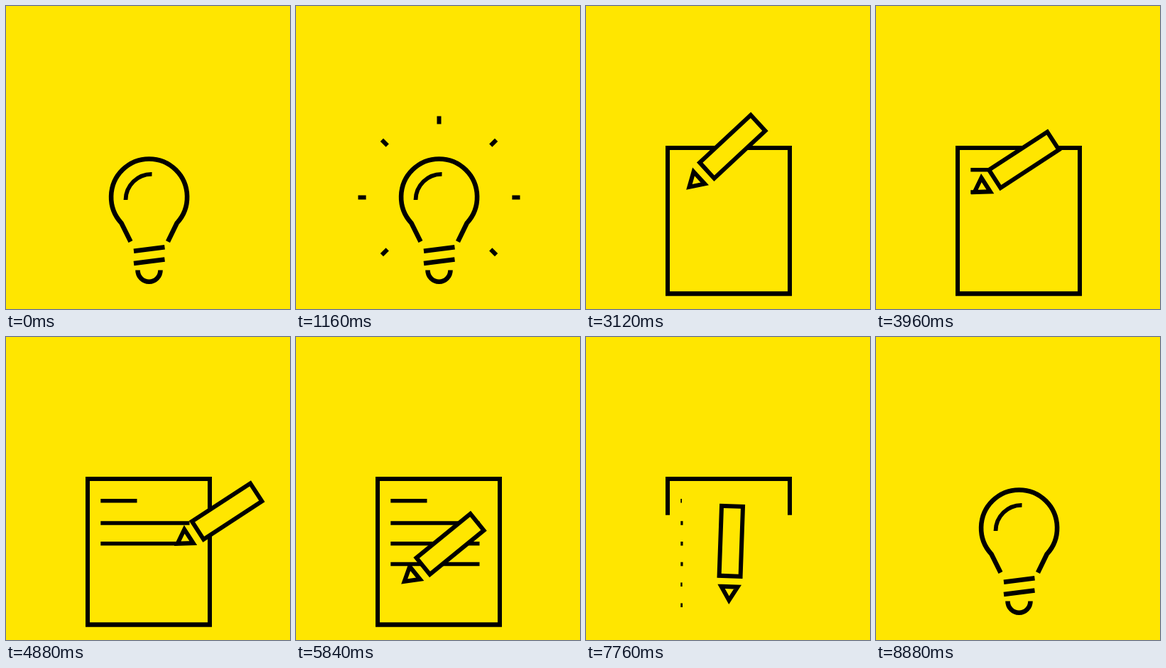
Write an HTML page that moves like this. It is 400 px wide and 425 px high and loops after 8.96 s.

```html
<!DOCTYPE html>
<html lang="en">
<head>
<meta charset="utf-8">
<title>Idea to page</title>
<style>
  html, body { margin: 0; width: 100%; height: 100%; overflow: hidden; background: #ffe600; }
  svg { display: block; width: 100vw; height: 100vh; }
  #stage { fill: none; stroke: #000; stroke-width: 6; stroke-miterlimit: 10; }
  #pencil { fill: #ffe600; }
  #text { stroke-width: 5.6; }
  #bulb { stroke-width: 6.6; }
</style>
</head>
<body>
<svg viewBox="0 0 400 425">
  <g id="stage">
    <g id="rays"></g>
    <g id="bulb">
      <path pathLength="1" d="M175.5 330.5L162.5 304.5A53.5 53.5 0 1 1 240.7 304.5L228 330.5"/>
      <path pathLength="1" stroke-width="5.8" d="M168.5 272A36.5 36.5 0 0 1 205.5 235.8"/>
      <path pathLength="1" d="M180 343.8L223.5 338.3"/>
      <path pathLength="1" d="M180 361L223.5 355.5"/>
      <path pathLength="1" d="M185.5 370.5A16 16.3 0 0 0 217.5 370.5"/>
    </g>
    <g id="paper">
      <path pathLength="1" d="M201 199H115V403.5H201"/>
      <path pathLength="1" d="M201 199H287V403.5H201"/>
      <path id="sheet" d="M115 199H287V403.5H115Z"/>
    </g>
    <g id="text"></g>
    <g id="pencil">
      <path pathLength="1" d="M-15 -132H15V-34H-15Z"/>
      <path pathLength="1" d="M-11.5 -19H11.5L0 0Z"/>
    </g>
  </g>
</svg>
<script>
const LOOP = 8960, STEP = 40, LEFT = 134, TILT = 57;
const REST = { x: 200.3, y: 369, r: 0 };
// y, right end, start time, end time
const LINES = [
  [229.8, 184.5, 3300, 3640],
  [261, 258.5, 3908, 4324],
  [289.8, 258.5, 4564, 4980],
  [318.5, 258.5, 5220, 5636],
  [347.2, 214.5, 5876, 6162],
  [376.2, 232, 6402, 7050]
];

const $ = id => document.getElementById(id);
const part = (t, a, b) => Math.min(1, Math.max(0, (t - a) / (b - a)));
const ease = (t, a, b) => (1 - Math.cos(Math.PI * part(t, a, b))) / 2;
const mix = (a, b, p) => a + (b - a) * p;
const show = (el, on) => { el.style.display = on ? "" : "none"; };

function add(parent) {
  return parent.appendChild(document.createElementNS("http://www.w3.org/2000/svg", "path"));
}

function trim(group, p) {
  for (const el of group.querySelectorAll("[pathLength]")) {
    el.setAttribute("stroke-dasharray", p < 1 ? `${p} 2` : "none");
  }
  show(group, p > 0);
}

const rays = Array.from({ length: 7 }, () => add($("rays")));
const rows = LINES.map(() => add($("text")));

function drawRays(t) {
  const inner = mix(76, 114, ease(t, 880, 1320));
  const outer = mix(76, 114, ease(t, 440, 880));
  show($("rays"), outer - inner > 0.2);
  rays.forEach((ray, i) => {
    const a = (i - 5) * Math.PI / 4;
    const at = r => `${201.5 + r * Math.cos(a)} ${268.5 + r * Math.sin(a)}`;
    ray.setAttribute("d", `M${at(inner)}L${at(outer)}`);
  });
}

function drawBulb(t) {
  const late = t > 5000;
  trim($("bulb"), late ? ease(t, 8240, 8870) : 1 - ease(t, 1400, 1760));
  const lean = late ? 0 : -68 * ease(t, 1340, 1720);
  $("bulb").setAttribute("transform", `rotate(${lean} 201.5 388)`);
}

function drawPaper(t) {
  const p = ease(t, 1840, 2400) - ease(t, 7360, 8040);
  trim($("paper"), p);
  show($("sheet"), p === 1);
}

function drawText(t) {
  const gone = ease(t, 7360, 7800);
  LINES.forEach(([y, end, a, b], i) => {
    const p = ease(t, a, b) - gone;
    show(rows[i], t > a && p > 0);
    rows[i].setAttribute("d", `M133.3 ${y}H${mix(LEFT, end, p)}`);
  });
}

function pose(t) {
  const [y0, , first] = LINES[0];
  if (t < first) {
    const p = ease(t, 2640, first);
    const swing = t < 2400 ? -68 * (1 - ease(t, 1640, 2040)) : 0;
    return { x: mix(REST.x, LEFT, p), y: mix(REST.y, y0, p), r: swing + TILT * p };
  }
  for (let i = 0; i < LINES.length; i++) {
    const [y, end, a, b] = LINES[i], next = LINES[i + 1];
    if (t <= b || !next) {
      const p = ease(t, a, b), back = ease(t, 7320, 7820);
      return {
        x: mix(mix(LEFT, end, p), REST.x, back),
        y: mix(y, REST.y, back),
        r: TILT * (1 - back)
      };
    }
    if (t < next[2]) {
      const p = part(t, b, next[2]);
      return { x: mix(end, LEFT, p), y: mix(y, next[0], p), r: TILT - 13.5 * Math.sin(Math.PI * p) };
    }
  }
}

function drawPencil(t) {
  const p = ease(t, 1600, 2000) - ease(t, 7820, 8240);
  trim($("pencil"), p);
  $("pencil").setAttribute("fill-opacity", p === 1 ? 1 : 0);
  const { x, y, r } = pose(t);
  $("pencil").setAttribute("transform", `translate(${x} ${y}) rotate(${r})`);
}

const start = performance.now();

function frame() {
  const t = Math.floor(((performance.now() - start) % LOOP) / STEP) * STEP;
  [drawRays, drawBulb, drawPaper, drawText, drawPencil].forEach(draw => draw(t));
  requestAnimationFrame(frame);
}
frame();
</script>
</body>
</html>
```
